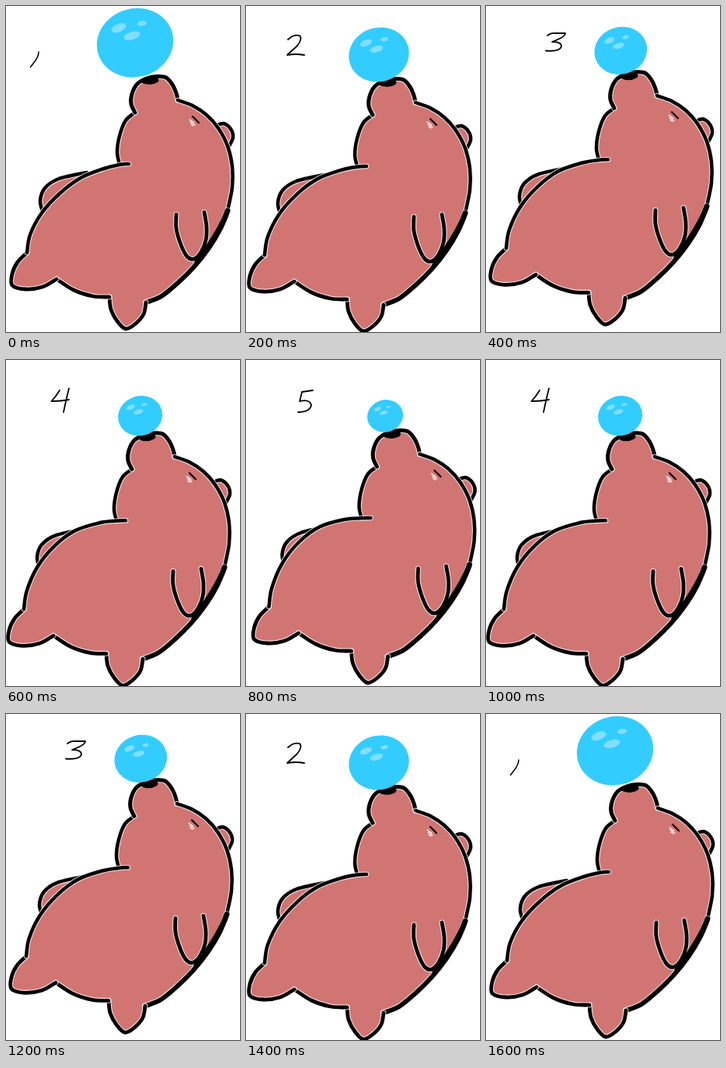
Write an HTML page that moves like this. It is 301 px wide and 419 px high and loops after 1.8 s.

```html
<!DOCTYPE html>
<html lang="en">
<head>
<meta charset="utf-8">
<title>Bear and ball</title>
<style>
html, body { margin: 0; width: 100%; height: 100%; overflow: hidden; background: #fff; }
svg { display: block; width: 301px; height: 419px; }
</style>
</head>
<body>
<svg id="stage" viewBox="0 0 301 419" fill="none" stroke-linecap="round" stroke-linejoin="round"></svg>
<script>
const SKIN = '#d17573', BALL = '#33ccff', SHINE = '#80deff';
const STEP = 200;
const ORDER = [0, 1, 2, 3, 4, 3, 2, 1, 0];

// Body offset, breath (how far the back swells), ball centre and size, counter stroke
const POSES = [
  { x: 0, y: 0, breath: 0, ball: [166, 47.3, 1], mark: 'M42 59Q42 64 38 70L31.5 78.5', pen: 1.5 },
  { x: -3, y: 3, breath: .35, ball: [171, 62.5, .79], mark: 'M54 43Q61 36 69 38Q73 42 66 51L53 63Q64 61 75 63', pen: 1.8 },
  { x: -1, y: -5.7, breath: .6, ball: [173.3, 57.4, .69], mark: 'M79 38Q83 34 91 35L102 35Q102 40 85 46Q97 46 97 52Q95 59 77 57.5', pen: 1.8 },
  { x: -4, y: 3.3, breath: 1, ball: [172.6, 71.8, .58], mark: 'M69 39Q64 47 58.5 53Q70 53 81 51M81 36.5Q77 52 74 67', pen: 1.8 },
  { x: 2.5, y: 0, breath: 1.3, ball: [179, 72, .47], mark: 'M72 41L69 53Q82 50 84 58Q82 67 67 67M72 41L86 39', pen: 1.8 }
];

const points = s => s.split(' ').map(p => p.split(',').map(Number));

// Smooth curve through points, without the opening move
function curve(p) {
  let d = '';
  for (let i = 0; i < p.length - 1; i++) {
    const a = p[i - 1] || p[i], b = p[i], c = p[i + 1], e = p[i + 2] || c;
    const q = [b[0] + (c[0] - a[0]) / 6, b[1] + (c[1] - a[1]) / 6,
               c[0] - (e[0] - b[0]) / 6, c[1] - (e[1] - b[1]) / 6, c[0], c[1]];
    d += 'C' + q.map(v => v.toFixed(1)).join(' ');
  }
  return d;
}
const line = p => `M${p[0]}` + curve(p);

const neck = points('146,203 143,188 146,167 154,147 166,137');
const snout = points('166,137 161,126 162,113 169,100 181,93 195,90.5 206,92 214,101 219,112 221,121');
const spine = points('221,121 240,128 258,140 273,157 285,180 291,206 291,233 285,263');
const rump = points('285,263 276,286 261,311 242,335 222,355 200,373 180,381');
const rightFoot = points('180,381 177,396 167,408 154,415 143,405 135,390 133,374');
const belly = points('133,374 112,373 87,365 65,351');
const leftFoot = points('65,351 47,361 25,364 8,359 8,344 15,329 27,317');
const back = points('27,317 31,294 46,266 69,241 96,221 126,209 146,204');
const swell = [0, .1, .6, 1, 1, .6, .1];
const tail = points('47,264 44,250 50,234 68,222 104,214');
const ear = points('270,154 280,151 289,158 292,169 286,182');
const arm = points('219,268 219,286 225,307 233,322 242,325 251,316 257,301 258,284 255,265');

function ink(d, width) {
  return `<path d="${d}" stroke="#fff" stroke-opacity=".75" stroke-width="${width + 2.2}"/>` +
         `<path d="${d}" stroke="#000" stroke-width="${width}"/>`;
}
const oval = (x, y, rx, ry, turn, fill) =>
  `<ellipse cx="${x}" cy="${y}" rx="${rx}" ry="${ry}" transform="rotate(${turn} ${x} ${y})" fill="${fill}"/>`;

function bear(pose) {
  const b = back.map(([x, y], i) => [x - 3 * swell[i] * pose.breath, y - 5 * swell[i] * pose.breath]);
  const parts = [neck, snout, spine, rump, rightFoot, belly, leftFoot, b];
  const shape = `M${neck[0]}` + parts.map(curve).join('') + 'Z';
  const topLine = line([...b, [158, 203]]);
  const behind = [tail, ear].map(p => `<path d="${line(p)}" fill="${SKIN}"/>` + ink(line(p), 4.5)).join('');
  const edges = [[line(neck), 4.5], [line(snout), 5], [line(spine), 4.5], [line(rump), 6],
    [line(rightFoot), 4.8], [line(belly), 4.8], [line(leftFoot), 4.8], [topLine, 4.5], [line(arm), 4.8]];
  return `<g transform="translate(${pose.x} ${pose.y})">${behind}<path d="${shape}" fill="${SKIN}"/>` +
    edges.map(e => ink(...e)).join('') +
    '<path d="M285 263Q277 288 246 329" stroke="#000" stroke-width="7"/>' +
    '<path d="M173 98Q178 92 195 92Q198 95 195 98Q185 104 173 98Z" fill="#000"/>' +
    '<path d="M236 146L242 150M237 149L243 153M238 152L241 154" stroke="#fff" stroke-width="1.2"/>' +
    '<path d="M240 142L248 150" stroke="#000" stroke-width="2.2"/></g>';
}

function ball([x, y, size]) {
  return `<g transform="translate(${x} ${y}) scale(${size})">` +
    oval(0, 0, 49.5, 44, -16, BALL) +
    oval(-21, -19, 10, 5.2, -22, SHINE) +
    oval(-4, -9, 11, 5, -16, SHINE) +
    oval(9, -25, 6, 3.2, -8, SHINE) + '</g>';
}

const scenes = POSES.map(p => bear(p) + ball(p.ball) +
  `<path d="${p.mark}" stroke="#000" stroke-width="${p.pen}"/>`);
const stage = document.getElementById('stage');
const start = performance.now();
let shown = -1;

function draw(now) {
  const step = Math.floor(Math.max(0, now - start) / STEP) % ORDER.length;
  const pose = ORDER[step];
  if (pose !== shown) {
    stage.innerHTML = scenes[pose];
    shown = pose;
  }
  requestAnimationFrame(draw);
}
draw(start);
</script>
</body>
</html>
```
